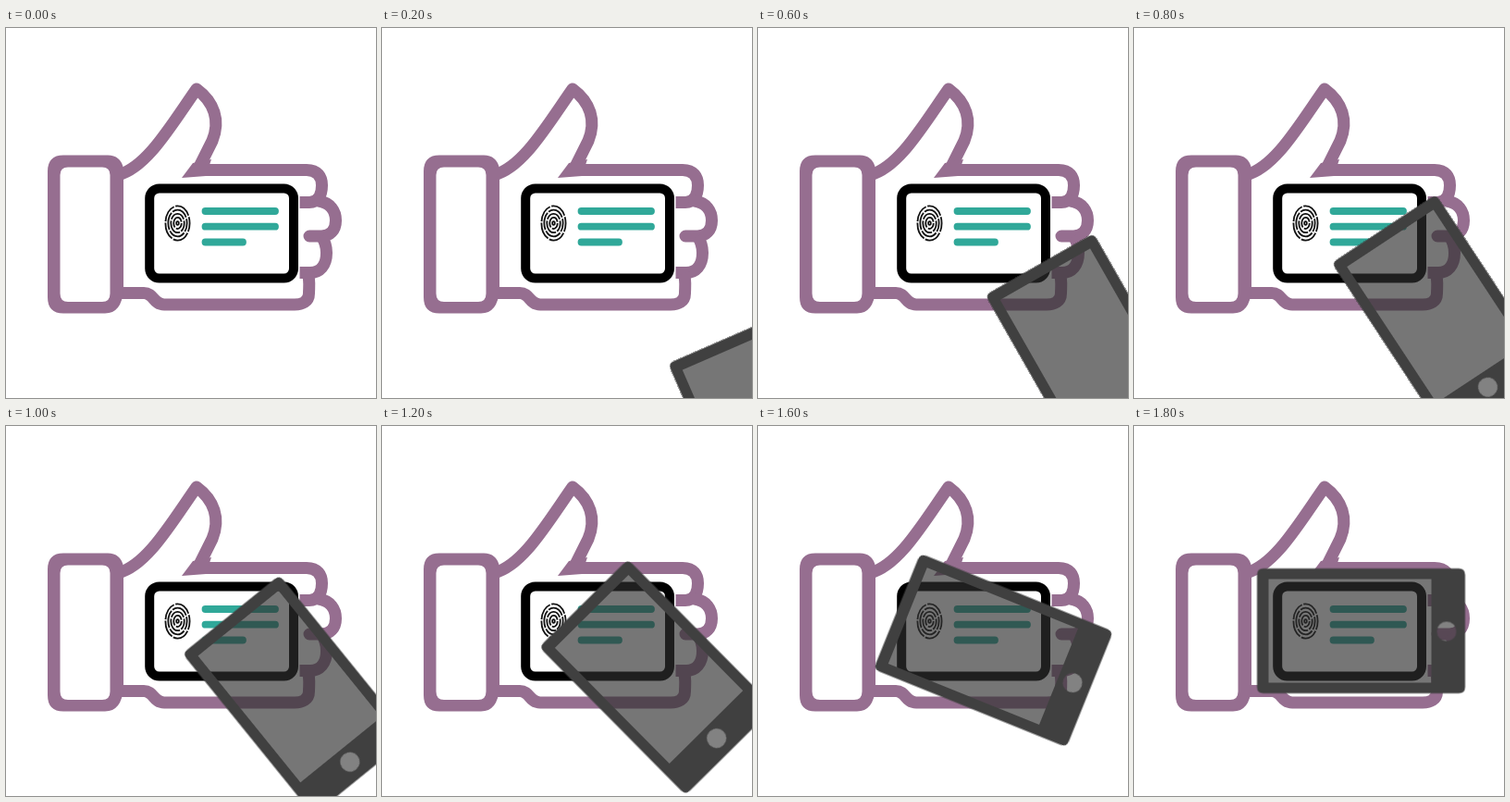
These frames come from a looping animation (400x400 px, 2000 ms). An HTML page:

```html
<!DOCTYPE html>
<html lang="en">
<head>
<meta charset="utf-8">
<title>Scanning an ID card</title>
<style>
  html, body { margin: 0; width: 100%; height: 100%; overflow: hidden; background: #fff; }
  svg { display: block; width: 100vw; height: 100vh; }
  .hand { fill: none; stroke: #966e90; stroke-width: 13; }
  .skin { fill: #966e90; fill-rule: evenodd; }
  .lines { stroke: #30a899; stroke-width: 7.8; stroke-linecap: round; }
  .print { fill: none; stroke: #111; stroke-width: 1.8; stroke-dasharray: 19 1.5; }
  .phone { animation: slide 2s step-end infinite; }

  @keyframes slide {
    0%   { transform: translate(700px, 700px) rotate(70deg); }
    10%  { transform: translate(416px, 439px) rotate(66.5deg); }
    20%  { transform: translate(388px, 395.7px) rotate(63.4deg); }
    30%  { transform: translate(360px, 353px) rotate(60.3deg); }
    40%  { transform: translate(332px, 310.8px) rotate(56.6deg); }
    50%  { transform: translate(314px, 291px) rotate(51deg); }
    60%  { transform: translate(297px, 271.5px) rotate(45.3deg); }
    70%  { transform: translate(281.5px, 257px) rotate(33.8deg); }
    80%  { transform: translate(254.5px, 242.5px) rotate(22deg); }
    90%, 100% { transform: translate(245.5px, 221.5px) rotate(0deg); }
  }
</style>
</head>
<body>
<svg viewBox="0 0 400 400">
  <g class="hand">
    <!-- thumb -->
    <path stroke-linejoin="round" d="M121 159C152 151 178 106 206 66C225 80 232 100 223 122L209 150"/>
    <!-- fingers -->
    <path d="M206 153.500H325C337 153.500 341.500 161 341.500 170C341.500 181 337 188.500 328 188.500H317.500"/>
    <path stroke-linecap="round" d="M338 187C351 189 356.500 198 356.500 208C356.500 219 350 225 341 225H328"/>
    <path d="M341 225C345 231 346.500 237 346.500 243C346.500 257 339 264.500 329 264.500H317.500"/>
    <path d="M326 265C329 273 327.500 280 327.500 287C327.500 296 320 299 312 299H171C159 299 160 286.500 149 286.500H120"/>
  </g>
  <path class="skin" d="M190 162L202 146L222 142L216 160Z"/>
  <!-- cuff -->
  <path class="skin" d="M62 137.500H110Q124 137.500 127 152V283Q125 308.500 107 308.500H62Q45 308.500 45 291V155Q45 137.500 62 137.500Z
    M67 150.500Q58.500 150.500 58.500 159V287Q58.500 296 67 296H104Q112.500 296 112.500 287V159Q112.500 150.500 104 150.500Z"/>

  <!-- card -->
  <rect x="155.200" y="173.500" width="155.800" height="97" rx="10.500" fill="#fff" stroke="#000" stroke-width="10"/>
  <g class="print" id="print"></g>
  <path class="lines" d="M215.500 198H291M215.500 214.700H291M215.500 231.500H256"/>

  <g class="phone">
    <rect x="-101" y="-57" width="178" height="114" fill="#2f2f2f" fill-opacity=".66"/>
    <circle cx="92.500" cy=".5" r="11" fill="#2f2f2f" fill-opacity=".6"/>
    <path fill="#404040" fill-rule="evenodd" d="M-105.500 -67.500H105.500Q112.500 -67.500 112.500 -60.500V60.500Q112.500 67.500 105.500 67.500H-105.500Q-112.500 67.500 -112.500 60.500V-60.500Q-112.500 -67.500 -105.500 -67.500Z
      M-100 -56V56H76V-56Z M82 .5a10.500 10.500 0 1 0 21 0a10.500 10.500 0 1 0 -21 0Z"/>
  </g>
</svg>
<script>
  // Broken oval rings make the fingerprint.
  const print = document.getElementById("print");
  for (let r = 1.3; r < 14; r += 2.95) {
    const ring = document.createElementNS("http://www.w3.org/2000/svg", "ellipse");
    const shape = { cx: 185.5, cy: 211, rx: r, ry: r * 1.42, "stroke-dashoffset": r * 7 };
    for (const key in shape) ring.setAttribute(key, shape[key]);
    print.append(ring);
  }
</script>
</body>
</html>
```
